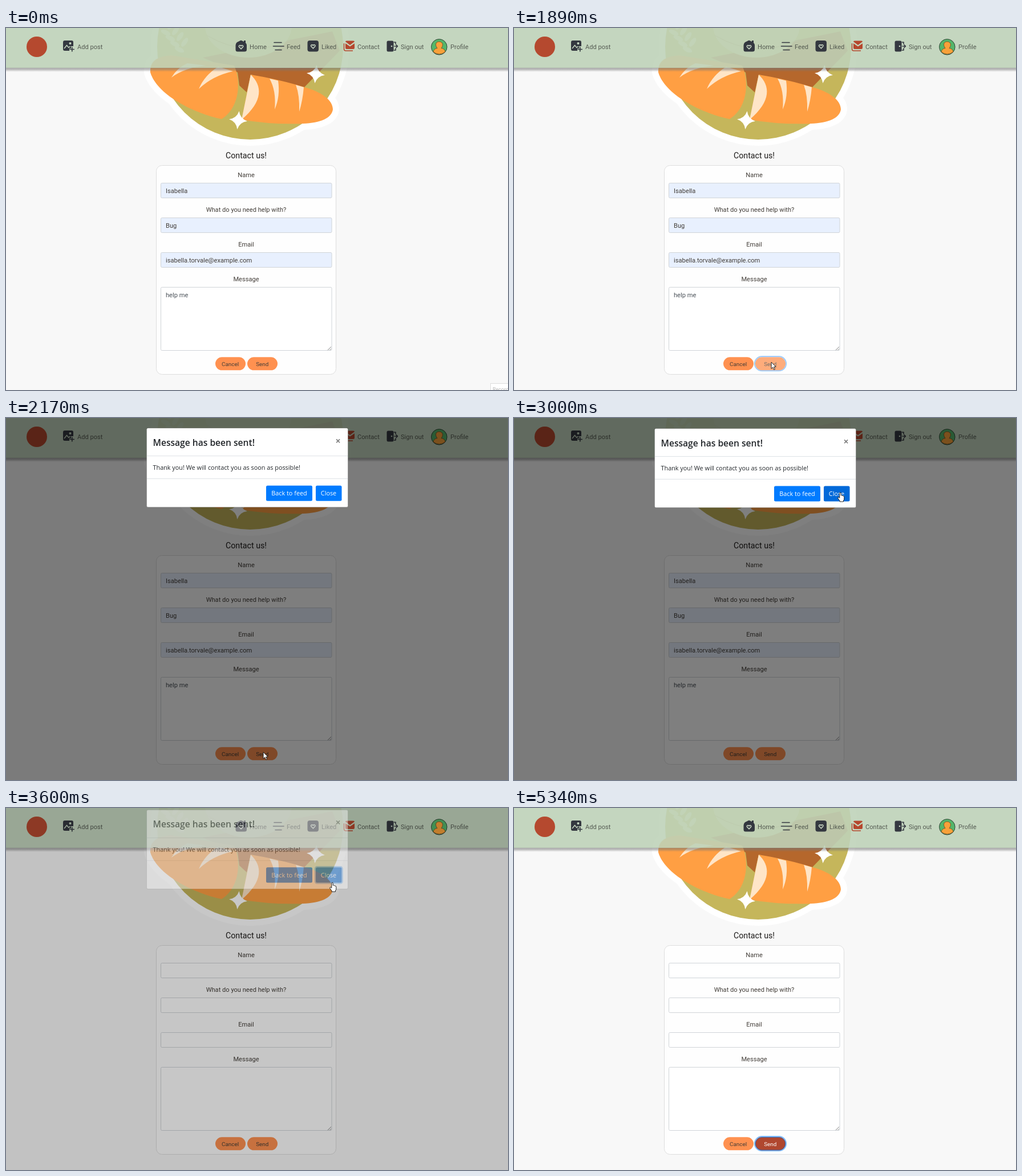
An HTML page for the animation above (6140 ms loop, 880 px wide and 636 px high).

```html
<!DOCTYPE html>
<html lang="en">
<head>
<meta charset="utf-8">
<title>Contact form</title>
<style>
  html, body { margin: 0; width: 100%; height: 100%; overflow: hidden; background: #f8f8f8; }
  svg { display: block; width: 100%; height: 100%; }
  text { font: 11.1px Roboto, sans-serif; fill: #423d38; }
  .mid { text-anchor: middle; }
  .heading { font-size: 14.2px; fill: #1d1b1a; }
  .nav text { fill: #555b52; }
  .icon { fill: #343840; }
  .line { fill: none; stroke: #343840; stroke-width: 1.6; stroke-linecap: round; stroke-linejoin: round; }
  .cream { fill: #ffe5c7; }
  .field { fill: #fff; stroke: #d0d4d8; }
  .filled .field { fill: #e8f0fe; }
  .small { font-size: 9.9px; }
  #modal text { font: 10.85px "Open Sans", sans-serif; fill: #212529; }
  #modal .title { font-size: 15.6px; font-weight: 600; }
  #modal .white { fill: #fff; }
  #modal .cross { font-size: 16px; font-weight: 700; fill: #7f7f7f; }
  .cursor { fill: #fff; stroke: #111; stroke-width: .9; stroke-linejoin: round; }
</style>
</head>
<body>
<svg viewBox="0 0 880 636">
  <defs>
    <linearGradient id="shade" x2="0" y2="1">
      <stop stop-color="#777" stop-opacity=".6"/>
      <stop offset=".45" stop-color="#777" stop-opacity=".5"/>
      <stop offset="1" stop-color="#777" stop-opacity="0"/>
    </linearGradient>
    <path id="leftLoaf" d="M253 78C252 60 262 50 290 48L400 66C411 90 412 138 378 160C330 150 265 118 253 78Z"/>
    <path id="rightLoaf" d="M429 82Q478 90 523 104C552 112 573 126 573 143C571 158 552 167 520 168Q465 170 413 161Z"/>
    <path id="star" d="M0-16Q3-3 16 0Q3 3 0 16Q-3 3-16 0Q-3-3 0-16Z" transform="rotate(6)"/>
    <path id="heart" d="M0 3.800L-3.200.500C-5-2 -1.500-4 0-1.300C1.500-4 5-2 3.200.500Z" fill="none" stroke="#c9d6c4" stroke-width="1.500"/>
  </defs>

  <g id="illustration">
    <g fill="#fff" stroke="#fff" stroke-width="22" stroke-linejoin="round">
      <circle cx="428" cy="33" r="163"/>
      <use href="#leftLoaf"/><use href="#rightLoaf"/>
    </g>
    <circle cx="428" cy="33" r="163" fill="#c5b65b"/>
    <g id="wheat" fill="#e9dfb0"></g>
    <path d="M345 52L572 6L585 40L523 104Q470 92 429 82L422 113L409 101L406 78Z" fill="#b5672c"/>
    <ellipse cx="425" cy="-4" rx="76" ry="56" fill="#dfc98e"/>
    <path d="M352 13Q425 56 500 20" fill="none" stroke="#b08a55"/>
    <use href="#leftLoaf" fill="#ff9f43"/>
    <use href="#rightLoaf" fill="#ff9f43"/>
    <g class="cream">
      <path d="M290 87Q300 70 318 62L350 66Q312 70 290 87Z"/>
      <path d="M338 107Q348 83 372 68L398 76Q362 84 338 107Z"/>
      <path d="M429 82C449 101 452 128 413 161Q421 122 429 82Z"/>
      <path d="M462 89L477 92.500Q481 120 471 143Q474 110 462 89Z"/>
      <path d="M508 100L522 104Q520 128 514 147Q515 118 508 100Z"/>
    </g>
    <g fill="#fff"><use href="#star" x="543" y="81"/><use href="#star" x="407" y="162"/></g>
  </g>

  <g class="nav">
    <rect y="69" width="880" height="8" fill="url(#shade)"/>
    <rect width="880" height="70" fill="#bed2b9" fill-opacity=".89"/>
    <circle cx="54" cy="33" r="18" fill="#b5492f"/>
    <g transform="translate(100 22)">
      <path class="icon" d="M3 0H15Q18 0 18 3V10H14V14H11V18H3Q0 18 0 15V3Q0 0 3 0Z"/>
      <path d="M2 14L6.500 8.500L10 12.500L12.500 10" fill="none" stroke="#c5d6c0" stroke-width="1.500"/>
      <circle cx="12.500" cy="5" r="2" fill="#c5d6c0"/>
      <path class="line" d="M15.800 12V19M12.300 15.500H19.300"/>
    </g>
    <path class="icon" d="M405 25L411 22Q412 21.500 413 22L417 24V22H420V26Q422 28 422 30V38Q422 41.500 418 41.500H406Q402.500 41.500 402.500 38V30Q402.500 27 405 25Z"/>
    <use href="#heart" x="412" y="33"/>
    <path class="line" d="M470 25.500H483M468.500 32H487M472 38.500H483"/>
    <rect class="icon" x="528.500" y="22" width="19.500" height="19.500" rx="4"/>
    <use href="#heart" x="538.300" y="32"/>
    <g fill="#b5472d">
      <path d="M595 24Q595 22.500 597 22.500H609Q611 22.500 611 24L603 30Z"/>
      <path d="M595 27L603 32.500L611 27V35Q611 37 609 37H597Q595 37 595 35Z"/>
      <path d="M592.500 27V37Q592.500 40 595.500 40H608" fill="none" stroke="#b5472d" stroke-width="1.500"/>
    </g>
    <path class="icon" d="M667.500 25Q667.500 22.500 670 22.500H677Q679.500 22.500 679.500 25V39Q679.500 41.500 677 41.500H670Q667.500 41.500 667.500 39Z"/>
    <circle cx="676" cy="32" r="1.300" fill="#c5d6c0"/>
    <path class="line" d="M680.500 25H683V28M680.500 39H683V36M681 32H686.500M684 29.500L686.500 32L684 34.500"/>
    <circle cx="759.300" cy="33.300" r="13.800" fill="#55b66a" stroke="#34433a"/>
    <path d="M749 42Q750 36 756 35.500C751 29 754 24 759.300 24S768 29 763 35.500Q769 36 770 42Q759.500 50 749 42Z" fill="#f8a13a" stroke="#6b4a22" stroke-width=".8"/>
    <g id="navLabels"></g>
  </g>

  <text class="mid heading" x="421" y="229">Contact us!</text>
  <rect x="263.500" y="241.500" width="315" height="367" rx="10" fill="#fefefe" stroke="#dedede"/>
  <g id="form"></g>
  <rect class="field" x="271.500" y="455.500" width="299.500" height="111" rx="2"/>
  <text id="message" x="280" y="472.500" style="fill:#495057">help me</text>
  <path d="M564 566L570 560M567.500 566L570 563.500" stroke="#666" stroke-width=".8"/>
  <rect x="367" y="578.300" width="53" height="23" rx="11.500" fill="#ff9150"/>
  <text class="mid small" x="393" y="593.500">Cancel</text>
  <g id="send">
    <rect id="sendRing" x="422" y="577.200" width="55" height="25" rx="12.500" fill="none" stroke="#80bdff" stroke-width="2.200"/>
    <rect x="423" y="578.300" width="53" height="23" rx="11.500" fill="#ff9150"/>
    <text class="mid small" x="449.300" y="593.500">Send</text>
    <g id="sendDark">
      <rect x="423" y="578.300" width="53" height="23" rx="11.500" fill="#b0472f"/>
      <rect id="sendBorder" x="423.300" y="578.600" width="52.400" height="22.400" rx="11.200" fill="none" stroke="#0062cc" stroke-width=".7"/>
      <text class="mid small" x="449.300" y="593.500" style="fill:#fff">Send</text>
    </g>
  </g>

  <g id="tip">
    <rect x="849.500" y="624.500" width="40" height="20" fill="#fff" stroke="#ddd"/>
    <text x="853" y="637.500" style="font-size:9px;fill:#bbb">Record</text>
  </g>

  <rect id="backdrop" width="880" height="636"/>

  <g id="modal">
    <rect x="246.500" y="18.500" width="353" height="139" rx="2.500" fill="#fff" stroke="#000" stroke-opacity=".2"/>
    <path d="M247 67.500H599M247 107.500H599" stroke="#dee2e6"/>
    <text class="title" x="257.500" y="49.500">Message has been sent!</text>
    <text class="cross mid" x="582" y="46.500">×</text>
    <text x="257.500" y="91.800">Thank you! We will contact you as soon as possible!</text>
    <rect x="456" y="119.500" width="81" height="27" rx="2.500" fill="#007bff"/>
    <text class="mid white" x="496.500" y="137">Back to feed</text>
    <rect id="closeRing" x="541.900" y="118.400" width="47.700" height="29.200" rx="3.500" fill="none" stroke="#268fff" stroke-opacity=".5" stroke-width="2.300"/>
    <rect id="close" x="543" y="119.500" width="45.500" height="27" rx="2.500"/>
    <text class="mid white" x="565.500" y="137">Close</text>
  </g>

  <path id="arrow" class="cursor" d="M0 0V11.500L2.700 9L4.600 13.300L6.500 12.500L4.700 8.300H8.200Z"/>
  <path id="hand" class="cursor" d="M-1.200 8V1.200Q-1.200 0 0 0T1.200 1.200V5Q2.500 4 3.200 5.500Q4.500 4.800 5 6.200Q6.800 5.800 6.800 7.500V11Q6.800 13 5.500 14V16H-1V14.500L-4.300 9.800Q-4.300 7.700-2.600 8.200L-1.200 9.500Z"/>
</svg>

<script>
const LOOP = 6140;
const SEND_HOVER = 790, SEND_FOCUS = 1240, SUBMIT = 1890, OPEN = 1905;
const CLOSE_HOVER = 2880, CLOSE_FOCUS = 3460, DISMISS = 3517, CLOSED = 3817;

// Pointer path: time, x, y
const PATH = [
  [350, 687, 604], [560, 590, 600], [770, 474, 589], [900, 451, 587], [2200, 451, 587],
  [2440, 524, 319], [2700, 552, 200], [2930, 571, 134], [3000, 572, 131], [4290, 572, 131],
  [4360, 576.5, 140.5], [4640, 615, 300], [4920, 665, 473], [5340, 810, 640]
];

const el = id => document.getElementById(id);
const clamp = v => Math.min(1, Math.max(0, v));
const ramp = (t, start, length = 150) => clamp((t - start) / length);
const easeOut = p => 1 - (1 - p) ** 1.7;
const show = (id, visible) => el(id).style.display = visible ? '' : 'none';
const fade = (id, opacity) => el(id).setAttribute('opacity', opacity);
const place = (id, x, y) => el(id).setAttribute('transform', `translate(${x} ${y})`);

el('navLabels').innerHTML = [
  [125, 'Add post'], [427, 'Home'], [492, 'Feed'], [553, 'Liked'],
  [616, 'Contact'], [692, 'Sign out'], [779, 'Profile']
].map(([x, label]) => `<text x="${x}" y="36.500">${label}</text>`).join('');

el('form').innerHTML = [
  ['Name', 'Isabella'], ['What do you need help with?', 'Bug'],
  ['Email', 'isabella.torvale@example.com'], ['Message']
].map(([label, value], i) => {
  const y = 272.5 + 61 * i;
  const input = value ? `<rect class="field" x="271.500" y="${y}" width="299.500" height="26" rx="2"/>
    <text class="value" x="280" y="${y + 17.5}">${value}</text>` : '';
  return `<text class="mid" x="421" y="${y - 10.5}">${label}</text>${input}`;
}).join('');
const values = document.querySelectorAll('.value');

el('wheat').innerHTML = Array.from({ length: 8 }, (_, i) => {
  const x = 280 + 8 * (i >> 1), y = 8 + 10 * (i >> 1);
  return `<ellipse cx="${x + (i % 2) * 16}" cy="${y}" rx="9" ry="4" transform="rotate(${i % 2 ? -55 : 25} ${x} ${y})"/>`;
}).join('');

function pointerAt(t) {
  const i = PATH.findIndex(point => point[0] > t);
  if (i < 1) return null;
  const [t0, x0, y0] = PATH[i - 1], [t1, x1, y1] = PATH[i];
  const p = (t - t0) / (t1 - t0);
  return [x0 + (x1 - x0) * p, y0 + (y1 - y0) * p];
}

function draw(t) {
  const filled = t < DISMISS;
  el('form').setAttribute('class', filled ? 'filled' : '');
  values.forEach(v => v.style.display = filled ? '' : 'none');
  show('message', filled);
  show('tip', t < 70);

  const beforeSubmit = t < SUBMIT, disabled = !beforeSubmit && t < 1960;
  const focus = disabled ? 1 : beforeSubmit ? ramp(t, SEND_FOCUS) : ramp(t, CLOSED, 70);
  fade('sendDark', beforeSubmit ? ramp(t, SEND_HOVER) : ramp(t, CLOSED, 70));
  fade('sendRing', focus);
  fade('sendBorder', focus);
  fade('send', disabled ? .75 : 1);

  const visible = ramp(t, OPEN) - ramp(t, DISMISS);
  const drop = easeOut(ramp(t, OPEN, 300)) - easeOut(ramp(t, DISMISS, 300));
  fade('backdrop', visible / 2);
  fade('modal', visible);
  place('modal', 0, 35.4 * (drop - 1));
  const h = ramp(t, CLOSE_HOVER, 100);
  el('close').setAttribute('fill', `rgb(0 ${123 - 18 * h} ${255 - 38 * h})`);
  fade('closeRing', ramp(t, CLOSE_FOCUS, 100));

  const pointer = pointerAt(t);
  const overSend = t >= SEND_HOVER && t < SUBMIT, overClose = t >= CLOSE_HOVER && t < CLOSED;
  const hand = overSend || overClose;
  show('arrow', pointer && !hand);
  show('hand', pointer && hand);
  if (pointer) place(hand ? 'hand' : 'arrow', ...pointer);
}

const start = performance.now();
function tick() {
  draw((performance.now() - start) % LOOP);
  requestAnimationFrame(tick);
}
tick();
</script>
</body>
</html>
```
